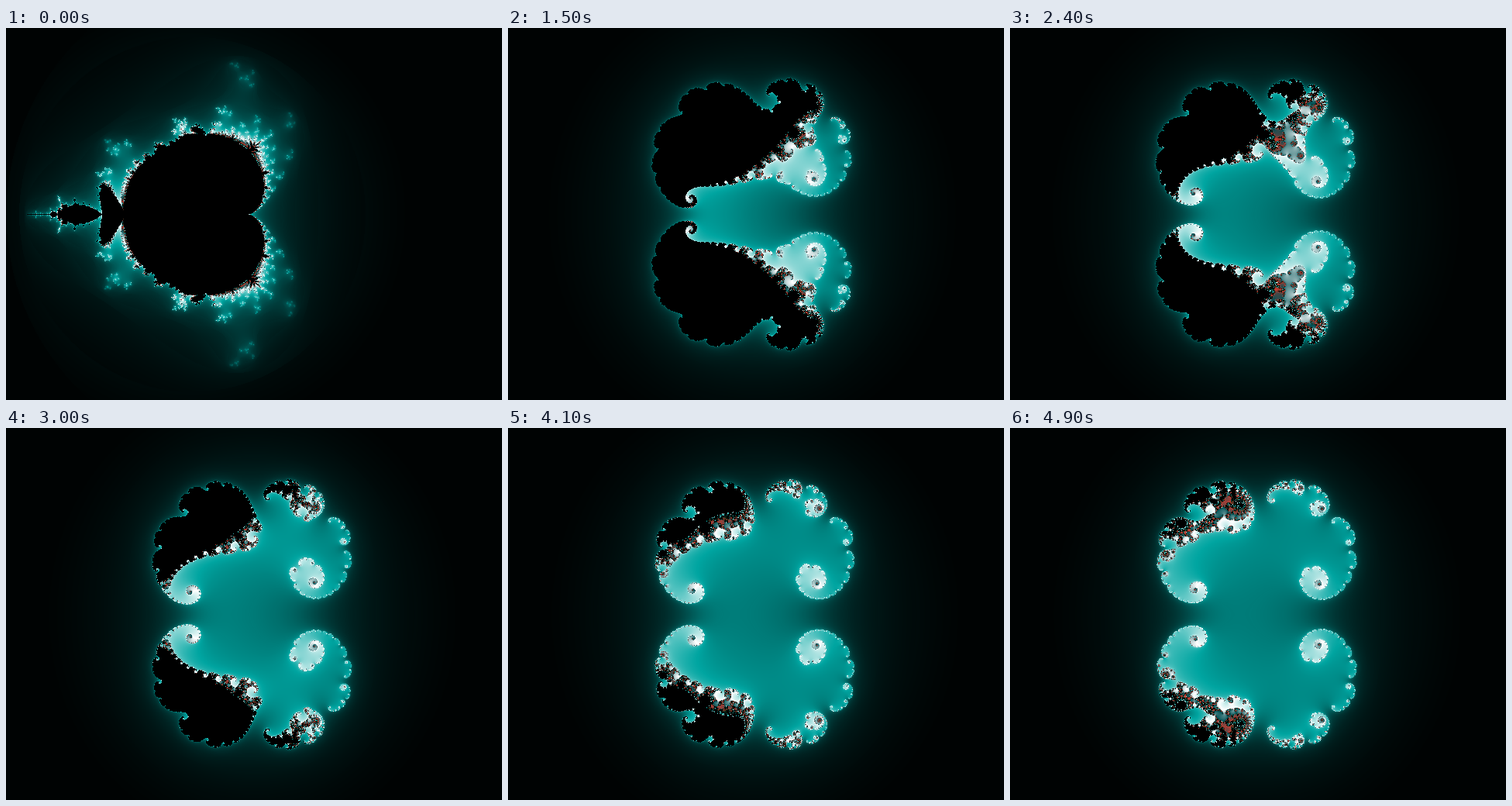
An HTML page with a canvas that plays this animation: 640 by 480 pixels, repeating every 5 s.

```html
<!DOCTYPE html>
<html lang="en">
<head>
<meta charset="utf-8">
<title>Mandelbrot to Julia</title>
<style>
  html, body { margin: 0; width: 100%; height: 100%; overflow: hidden; background: #000; }
  canvas { display: block; width: 640px; height: 480px; }
</style>
</head>
<body>
<canvas id="view" width="640" height="480"></canvas>
<script>
const W = 640, H = 480, SCALE = 160;
const STEPS = 50, STEP_MS = 100;
const MAX_ITER = 128, SEED = 0.3;
// Cyclic gradient, one stop every STOP_GAP iterations.
const STOP_GAP = 16;
const STOPS = [
  [0, 0, 0], [0, 165, 161], [255, 255, 255],
  [0, 80, 84], [200, 60, 50], [16, 44, 22]
];
const ctx = document.getElementById('view').getContext('2d');
const cache = [];
const start = performance.now();

// Smooth escape count of z -> z^2 + c, or -1 when the orbit stays bounded.
function escapeCount(zx, zy, cx, cy) {
  let n = 0, xx = zx * zx, yy = zy * zy;
  while (xx + yy <= 4) {
    if (++n > MAX_ITER) return -1;
    zy = 2 * zx * zy + cy;
    zx = xx - yy + cx;
    xx = zx * zx;
    yy = zy * zy;
  }
  return Math.max(0.25, n - Math.log2(Math.log2(xx + yy) / 2));
}

function color(m) {
  if (m < 0) return 0xff000000;
  const pos = m / STOP_GAP, i = Math.floor(pos), f = pos - i;
  const a = STOPS[i % STOPS.length], b = STOPS[(i + 1) % STOPS.length];
  const mix = k => Math.round(a[k] + (b[k] - a[k]) * f);
  return (255 << 24 | mix(2) << 16 | mix(1) << 8 | mix(0)) >>> 0;
}

// The pixel is the starting point; its share in c shrinks with each step.
function render(step) {
  const image = ctx.createImageData(W, H);
  const px = new Uint32Array(image.data.buffer);
  const share = 1 / (step + 1);
  for (let y = 0; y <= H / 2; y++) {
    const py = (H / 2 - y) / SCALE;
    for (let x = 0; x < W; x++) {
      const re = (x - W / 2) / SCALE;
      const c = color(escapeCount(re, py, SEED + re * share, py * share));
      px[y * W + x] = c;
      if (y > 0) px[(H - y) * W + x] = c;
    }
  }
  return image;
}

let shown = -1;
function draw(now) {
  const t = Math.max(0, now - start) % (STEPS * STEP_MS);
  const step = Math.floor(t / STEP_MS);
  if (step !== shown) {
    cache[step] = cache[step] || render(step);
    ctx.putImageData(cache[step], 0, 0);
    shown = step;
  }
  requestAnimationFrame(draw);
}
draw(start);
</script>
</body>
</html>
```
